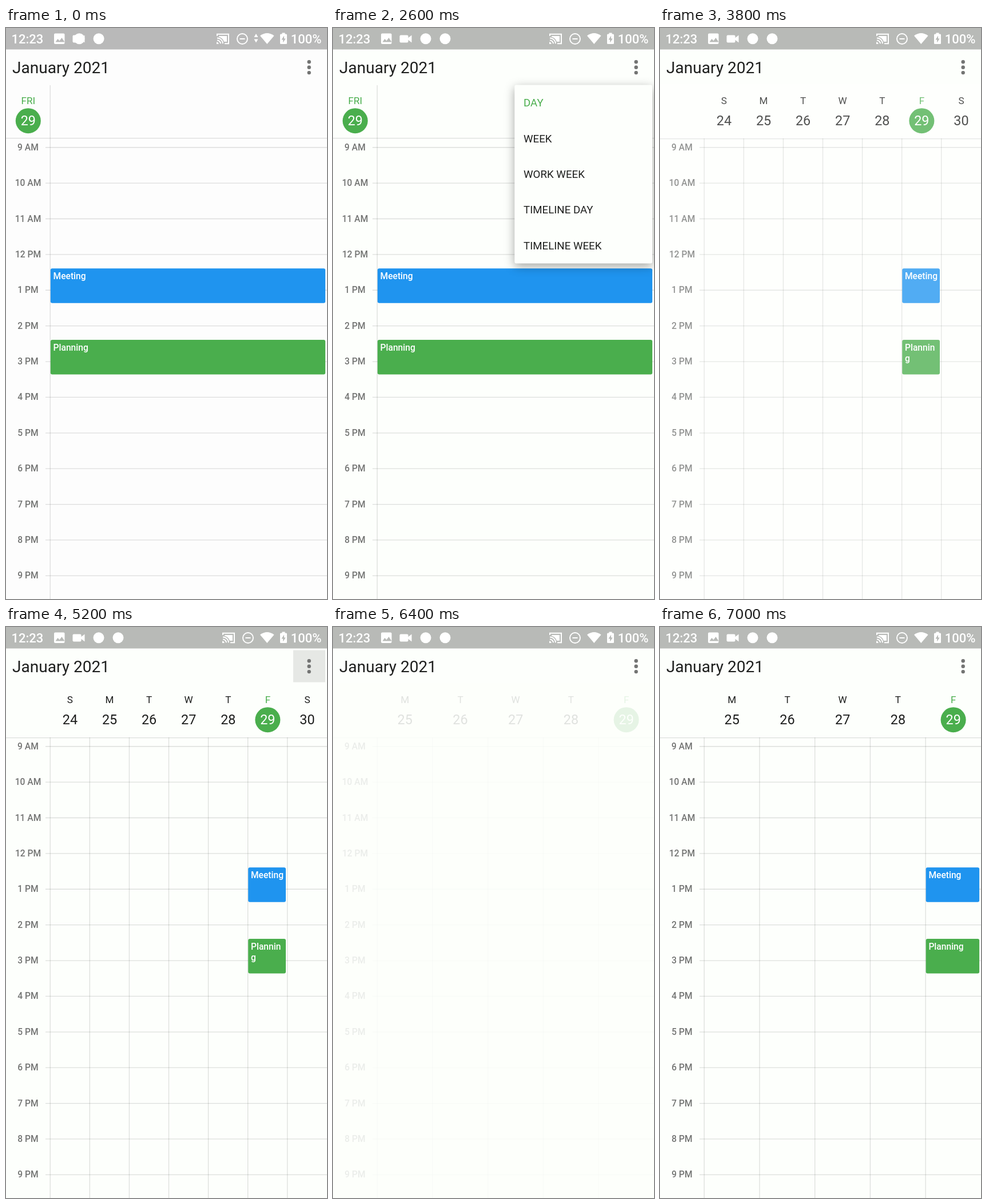
These frames come from a looping animation (561x998 px, 8 s). An HTML page with a canvas:

```html
<!DOCTYPE html>
<html lang="en">
<head>
<meta charset="utf-8">
<title>Calendar views</title>
<style>
  html, body { margin: 0; width: 100%; height: 100%; overflow: hidden; background: #fdfffc; }
  canvas { display: block; }
</style>
</head>
<body>
<canvas id="stage" width="561" height="998"></canvas>
<script>
const ctx = document.getElementById('stage').getContext('2d');
const W = 561, H = 998, LOOP = 8000;
const ROW = 62.38, GUTTER = 77.4;
const GREEN = '#4aae4d', BLUE = '#1f94ef', INK = '#1e1f1e', GREY = '#737473';
const LINE = 'rgba(0,0,0,.125)';

const VIEWS = {
  day: { days: ['FRI'], first: 29 },
  week: { days: [...'SMTWTFS'], first: 24 },
  workWeek: { days: [...'MTWTF'], first: 25 }
};
const MENU = ['DAY', 'WEEK', 'WORK WEEK', 'TIMELINE DAY', 'TIMELINE WEEK'];

// Each visit to the menu: opening, tapping a row, then the new view fading in.
const VISITS = [
  { open: 2300, grow: 300, tap: 3300, selected: 0, chosen: 1, view: VIEWS.week },
  { open: 5200, grow: 450, tap: 6200, selected: 1, chosen: 2, view: VIEWS.workWeek }
];

const clamp = v => Math.min(1, Math.max(0, v));
const span = (t, from, to) => clamp((t - from) / (to - from));
const easeIn = p => Math.pow(p, 1.6);

function text(str, x, y, size, color, weight = 400, align = 'center') {
  ctx.font = `${weight} ${size}px Roboto, sans-serif`;
  ctx.textAlign = align;
  ctx.fillStyle = color;
  ctx.fillText(str, x, y);
}
function rect(x, y, w, h, color, radius = 0) {
  ctx.fillStyle = color;
  ctx.beginPath();
  ctx.roundRect(x, y, w, h, radius);
  ctx.fill();
}
function disc(x, y, r, color) {
  ctx.fillStyle = color;
  ctx.beginPath();
  ctx.arc(x, y, r, 0, 7);
  ctx.fill();
}
function shape(d, color) {
  ctx.fillStyle = color;
  ctx.fill(new Path2D(d), 'evenodd');
}
function stroke(d, color, width) {
  ctx.strokeStyle = color;
  ctx.lineWidth = width;
  ctx.stroke(new Path2D(d));
}

function statusBar(t) {
  const bar = t < 100 ? '#b9b9b9' : '#b8bab7', white = '#fff';
  rect(0, 0, W, 37.5, bar);
  text('12:23', 9.5, 27, 22, white, 500, 'left');
  text('100%', 551.5, 27, 22, white, 500, 'right');

  rect(84, 9.5, 18.5, 18.5, white, 2);
  shape('M86.5 24.5l4-5.5 3 3.5 4-5.5 5 7.5z', bar);
  rect(116.5, 12.5, 15, 13, white, 2);
  shape('M131 17.5l6.5-5v13l-6.5-5z', white);
  const slide = 34 * span(t, 0, 400);
  disc(128 + slide, 18.8, 9.5, white);
  disc(162 + slide, 18.8, 9.5, white);

  const busy = t < 700;
  ctx.save();
  if (busy) ctx.translate(-10, 0);
  stroke('M379 14v-3.2h20v16.4h-7M379 17.5a10 10 0 0 1 10 9.8M379 21.5a6 6 0 0 1 6 5.8', white, 2);
  shape('M378 24.5a3.6 3.6 0 0 1 3.6 3.6H378zM382 14h14v10h-5a13 13 0 0 0-9-8.5z', white);
  stroke('M432 19a9 9 0 1 0-18 0a9 9 0 1 0 18 0M418.5 19h9', white, 1.9);
  ctx.restore();
  if (busy) shape('M433.5 16l3.5-6 3.5 6zM433.5 19.5h7l-3.5 6z', white);
  shape('M444 13.5q12.3-9 24.6 0L456.3 28z', white);
  shape('M482.5 10.5v-2h5v2h2q1.5 0 1.5 1.5v14.5q0 1.5-1.5 1.5h-9q-1.500 0-1.500-1.500V12q0-1.500 1.500-1.500zM486 13.500l-4.500 7h2.700v5l4.500-7H486z', white);
}

function eventBox(name, x, y, w, color) {
  rect(x, y, w, 60.5, color, 3);
  const lines = w < 70 && name.length > 7 ? [name.slice(0, 7), name.slice(7)] : [name];
  lines.forEach((s, i) => text(s, x + 4.7, y + 18.8 + i * 19, 15.6, '#fff', 500, 'left'));
}

function calendar(view, opacity, paper) {
  const count = view.days.length, single = count === 1;
  const colW = (W - GUTTER) / count;
  const headerY = single ? 192 : 193;
  rect(0, headerY, W, 1.3, LINE);
  for (let i = 0; i < count; i++) {
    const top = single ? 100 : headerY;
    rect(GUTTER + i * colW - .8, top, 1.3, H - top, LINE);
  }
  for (let i = 0; i < 13; i++) {
    const y = 208.7 + i * ROW, hour = 9 + i;
    rect(69, y - .6, W - 69, 1.3, LINE);
    text(`${(hour - 1) % 12 + 1} ${hour < 12 ? 'AM' : 'PM'}`, 38.5, y + 5.1, 15.6, GREY, 500);
  }
  view.days.forEach((day, i) => {
    const x = single ? 38.8 : GUTTER + (i + .5) * colW;
    const date = view.first + i, today = date === 29;
    if (today) disc(x, 162.2, 22, GREEN);
    text(day, x, 132.6, 17.1, today ? GREEN : INK);
    text(date, x, 170.3, 23.4, today ? '#fff' : INK);
    if (today && opacity > .2) {
      const left = GUTTER + i * colW + .4;
      eventBox('Meeting', left, 420.3, colW - 3.3, BLUE);
      eventBox('Planning', left, 545, colW - 3.3, GREEN);
    }
  });
  // Veil everything below the title to fade the view as one group.
  ctx.globalAlpha = 1 - opacity;
  rect(0, 98, W, H - 98, paper);
  ctx.globalAlpha = 1;
}

function menu(visit, t, paper) {
  const p = span(t, visit.open, visit.open + visit.grow), unit = 1 / 6.5;
  if (!p) return;
  const w = 240.7 * clamp(p / unit), h = 312 * clamp(p / (5 * unit));
  ctx.save();
  ctx.globalAlpha = clamp(p * 3);
  ctx.shadowColor = 'rgba(0,0,0,.36)';
  ctx.shadowBlur = 17;
  ctx.shadowOffsetY = 5;
  rect(558 - w, 99.6, w, h, paper, 3);
  ctx.shadowColor = 'transparent';
  if (t >= visit.tap) rect(317.3, 99.6 + visit.chosen * 62.4, 240.7, 62.4, 'rgba(0,0,0,.09)');
  MENU.forEach((label, i) => {
    ctx.globalAlpha = clamp((p - (i + 1) * unit) / (1.5 * unit));
    text(label, 333, 137.1 + i * 62.4, 18.7, i === visit.selected ? GREEN : INK, 400, 'left');
  });
  ctx.restore();
}

function draw(now) {
  const t = now % LOOP, paper = t < 100 ? '#fdfdfd' : '#fdfffc';
  const shown = VISITS.filter(v => t >= v.tap + 100).pop();
  const opacity = shown ? .1 + .9 * easeIn(span(t, shown.tap + 150, shown.tap + 570)) : 1;
  const active = VISITS.find(v => t >= v.open && t < v.tap + 100);

  rect(0, 0, W, H, paper);
  calendar(shown ? shown.view : VIEWS.day, opacity, paper);
  statusBar(t);
  text('January 2021', 11, 79, 28.05, INK, 400, 'left');
  if (active) {
    const fade = 1 - span(t, active.open + 60, active.open + active.grow);
    rect(502, 40.5, 56, 56, `rgba(0,0,0,${.09 * fade})`);
  }
  for (const y of [59.3, 68.7, 78.1]) disc(529.7, y, 3.2, '#737473');
  if (active) menu(active, t, paper);
  requestAnimationFrame(draw);
}
requestAnimationFrame(draw);
</script>
</body>
</html>
```
